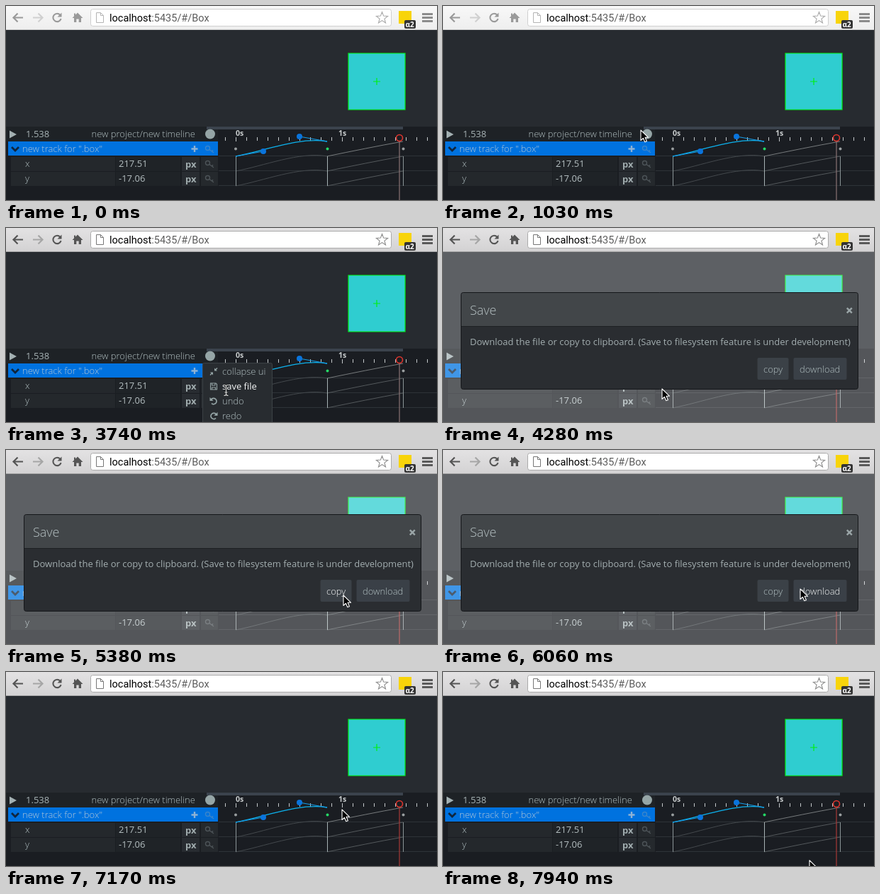
Write an HTML page with a canvas that moves like this. It is 608 px wide and 275 px high and loops after 8 s.

```html
<!DOCTYPE html>
<html lang="en">
<head>
<meta charset="utf-8">
<title>Timeline editor</title>
<style>
html, body { margin: 0; width: 608px; height: 275px; overflow: hidden; background: #272b30; }
canvas { display: block; }
</style>
</head>
<body>
<canvas id="stage" width="608" height="275"></canvas>
<script>
const ctx = document.getElementById('stage').getContext('2d');
const LOOP = 8000, STEP = 58.4;
const UI = '"Open Sans", "Noto Sans", sans-serif';
const GREY = '#95a5a6', SOFT = '#b2c0c2', WHITE = '#f6f8f8';

// Pointer path: time, x, y of the tip
const path = [
  [500, 251, 252], [1026, 279, 176], [1260, 281, 183], [2872, 281, 184],
  [3280, 328, 234], [3402, 328, 234], [3740, 310, 230], [4279, 310, 230],
  [4280, 309, 228], [4632, 309, 228], [4860, 360, 221], [5032, 360, 221],
  [5380, 476, 206], [5890, 486, 198], [6110, 520, 197], [6412, 520, 197],
  [6640, 474, 195], [7532, 474, 195], [7940, 517, 267], [8000, 517, 267]
];

function rect(x, y, w, h, fill) {
  ctx.fillStyle = fill;
  ctx.fillRect(x, y, w, h);
}
function round(x, y, w, h, r, fill, stroke) {
  ctx.beginPath();
  ctx.roundRect(x, y, w, h, r);
  if (fill) { ctx.fillStyle = fill; ctx.fill(); }
  if (stroke) { ctx.strokeStyle = stroke; ctx.lineWidth = 1; ctx.stroke(); }
}
function text(s, x, y, fill, size = 13, weight = 300, family = UI) {
  ctx.font = `${weight} ${size}px ${family}`;
  ctx.fillStyle = fill;
  ctx.fillText(s, x, y);
}
function dot(x, y, r, fill) {
  ctx.beginPath();
  ctx.arc(x, y, r, 0, 7);
  ctx.fillStyle = fill;
  ctx.fill();
}
function ring(x, y, r, stroke, width) {
  ctx.beginPath();
  ctx.arc(x, y, r, 0, 7);
  ctx.strokeStyle = stroke;
  ctx.lineWidth = width;
  ctx.stroke();
}
function trace(d, stroke, width = 1, x = 0, y = 0) {
  ctx.save();
  ctx.translate(x, y);
  ctx.strokeStyle = stroke;
  ctx.lineWidth = width;
  ctx.stroke(new Path2D(d));
  ctx.restore();
}
function shape(d, fill, x = 0, y = 0) {
  ctx.save();
  ctx.translate(x, y);
  ctx.fillStyle = fill;
  ctx.fill(new Path2D(d));
  ctx.restore();
}

// The toolbar is paler while the window has no focus
function drawBrowser(focused) {
  const g = ctx.createLinearGradient(0, 0, 0, 34);
  g.addColorStop(0, focused ? '#e3e2e3' : '#f8f8f8');
  g.addColorStop(1, focused ? '#d3d2d3' : '#eeeeee');
  rect(0, 0, 608, 34, g);
  rect(0, 33, 608, 1, focused ? '#a9a9a9' : '#cfcfcf');
  const ink = focused ? '#555' : '#9a9a9a', faint = focused ? '#a6a6a6' : '#d0d0d0';
  trace('M15 0H2M7.5 -6L1.5 0L7.5 6', ink, 2.2, 9, 16.5);
  trace('M0 0H13M7.5 -6L13.5 0L7.5 6', faint, 2.2, 38, 16.5);
  trace('M4.5 -3.7A5.7 5.7 0 1 0 5.6 1.5', ink, 2.1, 72, 16.5);
  shape('M6.5 -7V-1H0.5Z', ink, 72, 16.5);
  shape('M0 -7L7.5 0.5H5V6.5H1.7V2H-1.7V6.5H-5V0.5H-7.5L-5 -2V-6H-3V-4Z', ink, 101, 16.5);
  round(119.5, 4.5, 424, 24, 3, '#fff', focused ? '#aaa' : '#cfcfcf');
  trace('M127.5 9.5H133.5L137.5 13.5V23.5H127.5ZM133.5 9.5V13.5H137.5', focused ? '#777' : '#b4b4b4');
  const font = 'Roboto, "Liberation Sans", sans-serif';
  text('localhost', 146, 22, '#000', 14.5, 400, font);
  const w = ctx.measureText('localhost').width;
  text(':5435/#/Box', 146 + w, 22, '#5c5c5c', 14.5, 400, font);

  let star = '';
  for (let i = 0; i < 10; i++) {
    const a = i * Math.PI / 5, r = i % 2 ? 3.6 : 8.5;
    star += (i ? 'L' : 'M') + Math.sin(a) * r + ' ' + -Math.cos(a) * r;
  }
  trace(star + 'Z', focused ? '#8a8a8a' : '#a8a8a8', 1.1, 530.5, 17);
  rect(554, 7, 18, 18, '#f8d40a');
  round(562, 20, 16, 12, 2, '#333');
  text('α2', 563.5, 29.5, '#fff', 10, 700, '"Open Sans", sans-serif');
  for (const y of [10, 15, 20]) rect(587, y, 15, 3, focused ? '#5a5a5a' : '#8c8c8c');
}

function drawBox() {
  rect(0, 34, 608, 138, '#272b30');
  rect(483, 67, 80, 80, '#2fcdd0');
  trace('M483 67h80v80h-80zM518 107h10M523 102v10', '#00f010', 1.2);
}

function key(x, y, color) {
  ring(x - 2.5, y - 1.5, 3, color, 1.4);
  trace('M0 0.5L6 5M3.5 3L5 1.2', color, 1.4, x, y);
}

function drawRow(name, value, y) {
  rect(7, y, 147, 20, '#24282c');
  rect(155, y, 91, 20, '#1f2327');
  rect(248, y, 25, 20, '#282c31');
  rect(275, y, 24, 20, '#25292d');
  text(name, 27, y + 14, SOFT);
  text(value, 159, y + 14, '#b4bec0', 13, 400);
  text('px', 253, y + 15, '#a0acae', 13, 700);
  key(287, y + 10, '#4d5458');
}

function drawPanel(lineColor) {
  rect(0, 171, 608, 104, '#1a1d22');
  rect(0, 171, 299, 21, '#1e2226');
  rect(283, 171, 277, 4, '#3b434d');
  shape('M5 176.5L15 182L5 187.5Z', '#a3b0b2');
  text('1.538', 28, 186, '#a9b5b7', 13, 400);
  text('new project/new timeline', 120.5, 186, SOFT);
  dot(288, 181.5, 7, GREY);

  rect(3, 192, 296, 20, '#0072df');
  trace('M8 200L13 205L18 200', '#10253c', 2.8);
  text('new track for ".box"', 23, 207, '#b0c6d8');
  trace('M261.5 202.5h9M266 198v9', '#8fb2d4', 2.4);
  key(287, 203, '#3a85cb');
  drawRow('x', '217.51', 214);
  drawRow('y', '-17.06', 235);

  for (let i = -1; i < 19; i++) rect(324 + i * 15, 186, 1, i % 10 ? 5 : 6, '#c4c8ca');
  text('0s', 324, 184, '#c8cccd', 10.5, 700);
  text('1s', 469, 184, '#c8cccd', 10.5, 700);
  for (const y of [212.5, 233.5, 254.5]) trace(`M300 ${y}H608`, '#2e3338');

  const ease = 'M324 0C363 -7 414 -28 453 -21', ramp = 'M453 0C489 -7.4 524 -14.6 560 -21';
  for (const y of [234, 255]) {
    trace(ease, '#44494d', 1, 0, y);
    trace(ramp, '#54595c', 1, 0, y);
  }
  trace(ramp, '#777b7d', 1, 0, 213);
  trace('M324.5 213V255M560.5 213V255', '#8a9496');
  trace('M453.5 213V255', '#a6b2b4');
  trace(ease, '#0cb2ee', 1.3, 0, 213);
  trace('M324 213L363 206M414 185L453 192', '#159ce8', 1.2);
  dot(363, 206, 4, '#0a74dc');
  dot(414, 185, 4, '#0a74dc');
  dot(324, 202.5, 2, '#999e9f');
  dot(453.5, 202.5, 2, '#24d865');
  dot(560.5, 202.5, 2, '#999e9f');

  trace('M555 192V275', lineColor, 1.2);
  ring(555, 187, 4.5, '#e0362e', 1.6);
}

function drawMenu(hot) {
  round(277.5, 191.5, 98, 90, 2, '#282c30', '#3c4145');
  const c = GREY;
  shape('M1 -1V-5L2.5 -3.5L4.5 -5.5L5.5 -4.5L3.5 -2.5L5 -1ZM-1 1V5L-2.5 3.5L-4.5 5.5L-5.5 4.5L-3.5 2.5L-5 1Z', c, 293, 203.5);
  trace('M-4.5 -4.5H3L4.5 -3V4.5H-4.5ZM-2.5 -4.5V-1.5H2V-4.5M-2.5 4.5V1.5H2.5V4.5', c, 1.1, 293, 224.5);
  const back = 'M-3.5 -2.5A4.2 4.2 0 1 1 -3 3.2', tip = 'M-5.5 -5.5V-0.5H-0.5Z';
  trace(back, c, 1.7, 293, 245.5);
  shape(tip, c, 293, 245.5);
  ctx.save();
  ctx.translate(293, 266.5);
  ctx.scale(-1, 1);
  trace(back, c, 1.7);
  shape(tip, c);
  ctx.restore();
  ['collapse ui', 'save file', 'undo', 'redo'].forEach((s, i) =>
    text(s, 305, 208 + i * 21, i === 1 && hot ? WHITE : SOFT, 13, i === 1 && hot ? 400 : 300));
}

function drawButton(s, x, w, fill, color) {
  round(x, 184, w, 31, 2, fill);
  text(s, x + 8.5, 205, color);
}

function drawDialog(x, pressed) {
  rect(0, 34, 608, 241, 'rgba(255,255,255,.25)');
  round(25.5, 91.5, 560, 137, 3, '#2a2d31', '#15171a');
  round(26, 92, 559, 47, [3, 3, 0, 0], '#424649');
  rect(26, 139, 559, 1, '#1d2023');
  text('Save', 38, 123, '#b6c1c3', 18);
  trace('M569.8 113.3L576.8 120.3M576.8 113.3L569.8 120.3', '#9aa5a7', 2.4);
  text('Download the file or copy to clipboard. (Save to filesystem feature is under development)',
    38, 166, '#a3aeb0', 13, 400);
  const copyHot = x >= 444 && x < 488, loadHot = x >= 494;
  drawButton('copy', 443.5, 44, pressed ? '#2d3237' : '#3b4147', pressed ? '#3cc4d2' : copyHot ? WHITE : SOFT);
  drawButton('download', 494.5, 75, '#3a4047', loadHot ? WHITE : SOFT);
}

function drawPointer(t, x, y) {
  ctx.lineJoin = 'round';
  if (t >= 1980 && t < 2930) {
    const hand = 'M2.5 1.5C2.5 -0.5 5.5 -0.5 5.5 1.5V6C7 5 8 5.5 8.5 6.5C10 5.8 11 6.3 11.3 7.3C13 6.8 14 7.8 13.8 9.5C13.6 12 12.5 13 12 16.5H5C4 13.5 1.5 12 0.5 9C0.2 7.5 2 7.5 2.7 9Z';
    shape(hand, '#fff', x - 2, y);
    trace(hand + 'M6.5 10.5V14M8.5 10.5V14M10.5 10.5V14', '#111', 1, x - 2, y);
  } else if (t < 4280 && x > 303 && y > 214) {
    const beam = 'M-3 -7.5Q0 -7.5 0 -5.5Q0 -7.5 3 -7.5M0 -5.5V5.5M-3 7.5Q0 7.5 0 5.5Q0 7.5 3 7.5M-2 3H2';
    trace(beam, '#2a2a2a', 2.4, x + 0.5, y);
    trace(beam, '#d5d8d8', 1.1, x + 0.5, y);
  } else {
    const arrow = 'M0 0V14.5L3.4 11.3L5.8 16.8L8.4 15.7L6.1 10.3H10.6Z';
    shape(arrow, '#000', x, y);
    trace(arrow, '#fff', 1.1, x, y);
  }
  ctx.lineJoin = 'miter';
}

function pointerAt(t) {
  let i = 0;
  while (i < path.length - 2 && t >= path[i + 1][0]) i++;
  const [t0, x0, y0] = path[i], [t1, x1, y1] = path[i + 1];
  const p = Math.floor((t - t0) / STEP) * STEP / (t1 - t0);
  return [x0 + (x1 - x0) * p, y0 + (y1 - y0) * p].map(Math.round);
}

function draw(t) {
  const [x, y] = pointerAt(Math.max(t, 500));
  drawBrowser(t >= 1320);
  drawBox();
  drawPanel(t < 4280 ? '#8a7476' : '#a83a38');
  if (t >= 2510 && t < 4280) drawMenu(y >= 214 && y < 236);
  if (t >= 4280 && t < 7170) drawDialog(x, t >= 6930);
  if (t >= 500) drawPointer(t, x, y);
}

const start = performance.now();
function tick(now) {
  draw(Math.max(0, now - start) % LOOP);
  requestAnimationFrame(tick);
}
draw(0);
requestAnimationFrame(tick);
</script>
</body>
</html>
```
